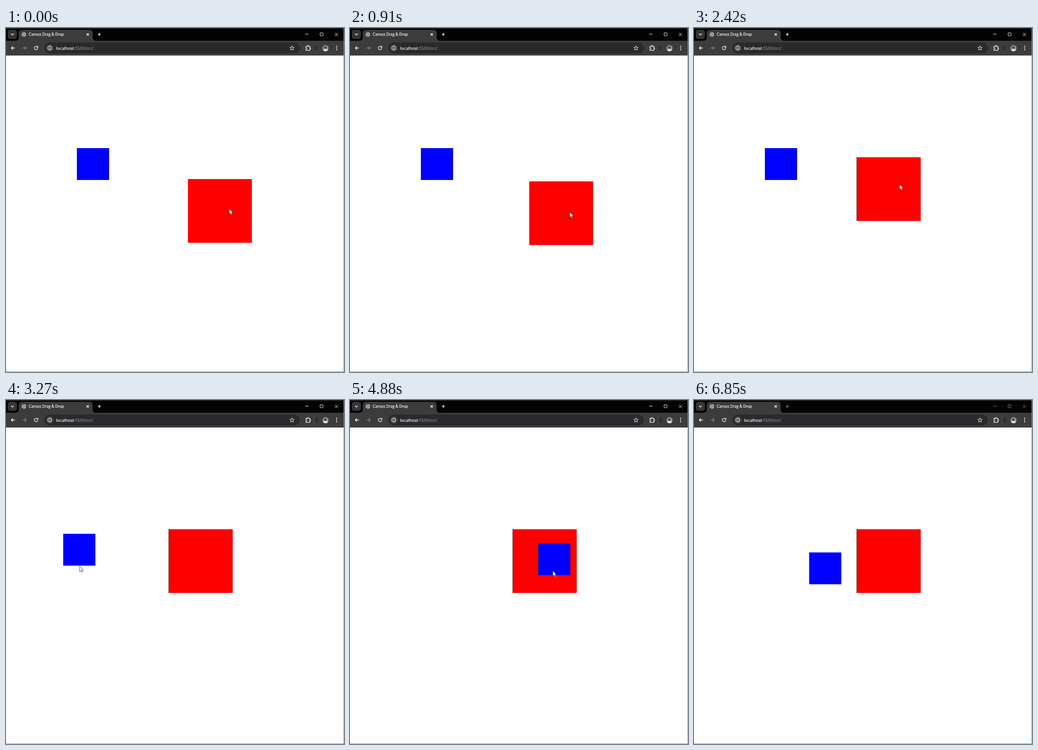
These frames come from a looping animation (741x756 px, 6.91 s). An HTML page:

```html
<!DOCTYPE html>
<html lang="en">
<head>
<meta charset="utf-8">
<title>Canvas Drag &amp; Drop</title>
<style>
  html, body { margin: 0; width: 100%; height: 100%; overflow: hidden; background: #fff; }
  svg { display: block; font-family: "Open Sans", "Noto Sans", sans-serif; }
  .line { fill: none; stroke: #fff; stroke-width: 1.3; }
  .label { fill: #fff; stroke: #fff; stroke-width: .2; }
</style>
</head>
<body>
<svg width="741" height="756" viewBox="0 0 741 756">
  <!-- tab strip -->
  <rect width="741" height="29" fill="#020303"/>
  <rect width="741" height="1" fill="#444"/>
  <rect x="4" y="4" width="20" height="20" rx="6" fill="#353535"/>
  <path class="line" d="M11 12.5l3 3 3-3"/>
  <path d="M21 28q7 0 7-7v-9q0-8 8-8h146q8 0 8 8v9q0 7 7 7z" fill="#3c3c3c"/>
  <circle cx="39.3" cy="14.3" r="5" fill="#b9bcc0"/>
  <path d="M35 13q3 0 4 2t2 0 3 1M38 10q1 3 4 2M36 17l3 1" fill="none" stroke="#55585c" stroke-width="1.2"/>
  <text class="label" x="50" y="17.2" font-size="8.2">Canvas Drag &amp; Drop</text>
  <path class="line" d="M176.7 11.7l5 5m0-5l-5 5"/>
  <g id="controls" class="line">
    <path d="M201 14.2h7M204.5 10.7v7"/>
    <path stroke-width="1" d="M656 13.5h7M720.8 10.8l7 7m0-7l-7 7"/>
    <rect stroke-width="1" x="688.5" y="10.5" width="6.5" height="6.5" rx="1.5"/>
  </g>

  <!-- toolbar -->
  <rect y="28" width="741" height="32.5" fill="#3c3c3c"/>
  <rect x="84" y="32" width="560" height="24" rx="12" fill="#282a2d"/>
  <path class="line" d="M19.5 44h-8m3.7-3.7L11.5 44l3.7 3.7"/>
  <path class="line" style="stroke:#858585" d="M36.5 44h8m-3.7-3.7l3.7 3.7-3.7 3.7"/>
  <path class="line" d="M69 41.6a3.8 3.8 0 1 0 .6 3.4M70 39.7v2.9h-3"/>
  <circle cx="96" cy="44" r="8.5" fill="#3c3c3c"/>
  <circle class="line" cx="96" cy="44" r="4.3"/>
  <path class="line" d="M96 43.4v3M96 41.3v1.1"/>
  <text class="label" x="110" y="47.6" font-size="9.3">localhost<tspan fill="#a2a5a8" stroke="none">:5500/src/</tspan></text>
  <path class="line" style="stroke-width:1" d="M627 39.3l1.4 3.2 3.5.3-2.7 2.3.8 3.4-3-1.8-3 1.8.8-3.4-2.7-2.3 3.5-.3z"/>
  <path class="line" d="M657.5 40.5h3q0-2 1.3-2t1.3 2h3v3q2 0 2 1.3t-2 1.3v3h-8.6v-2.8q2-.2 2-1.6t-2-1.6z"/>
  <rect x="680" y="39" width="1.4" height="10" fill="#111"/>
  <circle cx="700.5" cy="44.3" r="6.7" fill="#87918f"/>
  <path d="M695 48.5q2-3 5.5-3t5.5 3a6.7 6.7 0 0 1-11 0z" fill="#d5dddc"/>
  <circle cx="700" cy="43" r="3" fill="#60483f"/>
  <g fill="#fff">
    <circle cx="725" cy="40" r="1.15"/><circle cx="725" cy="44" r="1.15"/><circle cx="725" cy="48" r="1.15"/>
  </g>

  <!-- page -->
  <g id="red">
    <rect width="140" height="140" fill="#f00"/>
    <rect id="edge" x="-.5" width="1" height="140" fill="#300"/>
  </g>
  <g id="blue">
    <rect width="70" height="70" fill="#00f"/>
    <rect x="-.5" width="1" height="70" fill="#004"/>
  </g>
  <path id="cursor" d="M.5.5v11.6l2.7-2.5 1.8 4.2 2-.9-1.8-4h3.7z" fill="#fff" stroke="#222" stroke-width=".8"/>
  <path d="M740.5 0v755.5H0" fill="none" stroke="#8a8a8a"/>
</svg>
<script>
const LOOP = 6910, LAG = 35;
const $ = id => document.getElementById(id);

// Pointer moves: each drifts to (x, y) while circling once anticlockwise,
// with the circle entered at the given angle in degrees.
const home = { x: 493, y: 391 };
const moves = [
  { from: -35, to: 875, x: 487, y: 396, radius: 50, angle: -150 },
  { from: 875, to: 1545, x: 280, y: 372, radius: 50, angle: 180 },
  { from: 1580, to: 2055, x: 283, y: 374, radius: 30, angle: 60 },
  { from: 2150, to: 2385, x: 451, y: 343 },
  { from: 2605, to: 3040, x: 197, y: 318, radius: 25, angle: 180 },
  { from: 3100, to: 3755, x: 213, y: 383, radius: 48, angle: -100 },
  { from: 3755, to: 4845, x: 454, y: 369, radius: 45, angle: -165 },
  { from: 4845, to: 5295, x: 294, y: 389, radius: 20, angle: -150 },
  { from: 5600, to: 5750, x: 144, y: 317 }
];

const clamp = (v, lo, hi) => Math.min(Math.max(v, lo), hi);
const ease = u => u - Math.sin(2 * Math.PI * u) / (4 * Math.PI);

function pointer(t) {
  let { x, y } = home;
  for (const { from, to, radius = 0, angle = 0, ...end } of moves) {
    if (t < from) break;
    const u = ease(clamp((t - from) / (to - from), 0, 1));
    const a = angle * Math.PI / 180, b = a - 2 * Math.PI * u;
    x += (end.x - x) * u + radius * (Math.cos(b) - Math.cos(a));
    y += (end.y - y) * u + radius * (Math.sin(b) - Math.sin(a));
  }
  return { x, y };
}

function place(id, { x, y }, dx, dy) {
  $(id).setAttribute("transform", `translate(${Math.round(x - dx)} ${Math.round(y - dy)})`);
}

const start = performance.now();
function draw() {
  const t = (performance.now() - start) % LOOP;
  // dragged boxes trail the pointer
  place("red", pointer(Math.min(t - LAG, 2385)), 94, 59);
  place("blue", pointer(clamp(t - LAG, 3040, 5295)), 41, 54);
  place("cursor", pointer(t), 1, 0);
  $("cursor").style.display = t < 5790 ? "" : "none";
  $("edge").style.display = t < 1450 ? "none" : "";
  $("controls").style.stroke = t < 6850 ? "#fff" : "#858585";
  requestAnimationFrame(draw);
}
draw();
</script>
</body>
</html>
```
